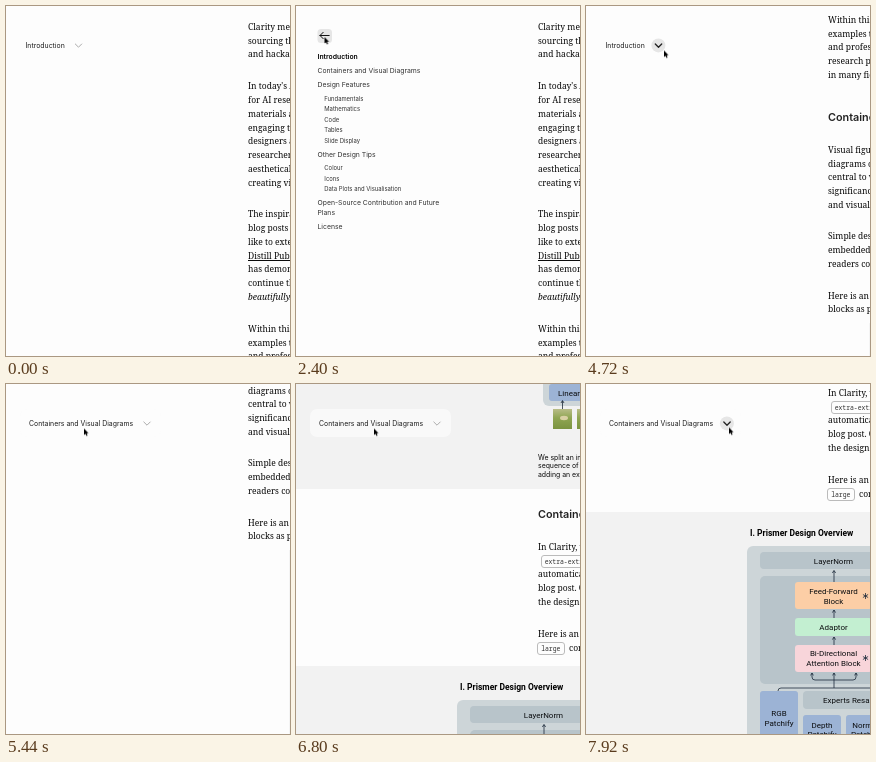
An HTML page that plays this animation: 284x350 px, repeating every 8 s.

```html
<!DOCTYPE html>
<html lang="en">
<head>
<meta charset="utf-8">
<title>Article with a floating table of contents</title>
<style>
  html, body { margin: 0; width: 100%; height: 100%; overflow: hidden; background: #fdfdfd; }
  #stage { position: absolute; inset: 0 auto auto 0; width: 284px; height: 350px; overflow: hidden; background: #fdfdfd; }
  svg { position: absolute; left: 0; width: 284px; height: 350px; overflow: visible; }

  /* One percent of every animation is 80 ms. */
  #article, #nav g[id], #cursor { animation: 8s linear both paused; }

  #article { position: absolute; left: 0; top: 0; animation-name: scroll; }
  #article p, #article h2 { position: absolute; left: 242px; margin: 0; white-space: pre; color: #0a0a0a; }
  #article p { font: 8.5px/13.8px "Noto Serif", serif; margin-top: .5px; }
  #article h2 { font: 600 10.8px/14px Inter, sans-serif; color: #222; }
  #article p.caption { font: 6.9px/8.4px Inter, sans-serif; }
  code { font: 6.4px/1 "Noto Sans Mono", monospace; padding: 1.2px 3.2px; border: .6px solid #bbb; border-radius: 3px; background: #fdfdfd; color: #333; }
  .panel { position: absolute; left: 0; width: 284px; background: #f2f2f2; }
  .block { position: absolute; left: 283px; width: 60px; background: #f4f4f4; }

  .fig text { font: 8px Roboto, sans-serif; fill: #0c0e10; text-anchor: middle; }
  .fig text.title { font: 700 8.5px Roboto, sans-serif; fill: #000; text-anchor: start; }
  .shell { fill: #cdd5d8; } .inner { fill: #b8c4ca; } .blue { fill: #9cb3d5; }
  .wire { fill: none; stroke: #1c2a3a; stroke-width: .8; }

  #nav text { font: 6.92px Inter, sans-serif; fill: #1c1c1c; }
  #nav #toc text { font-size: 6.83px; fill: #333; }
  #nav #toc .sub text { font-size: 5.9px; }
  #nav #toc .now { font-weight: 600; fill: #000; font-size: 6.85px; }
  .line { fill: none; stroke: #aaa; stroke-width: 1; stroke-linecap: round; stroke-linejoin: round; }
  .dark { stroke: #222; stroke-width: 1.3; }
  .arrow { stroke: #555; }
  .arrow.dark { stroke: #111; stroke-width: 1; }
  .spot { fill: #e6e6e6; }

  #intro { animation-name: intro !important; }
  #introHover { animation-name: introHover !important; }
  #toc { animation-name: toc !important; }
  #backHover { animation-name: backHover !important; }
  #section { animation-name: section !important; }
  #sectionHover { animation-name: sectionHover !important; }
  #cursor { animation-name: cursor; }

  @keyframes scroll {
    0% { transform: translateY(0); }
    54% { transform: translateY(0); animation-timing-function: cubic-bezier(.3, .2, .4, 1); }
    65%, 67% { transform: translateY(-456px); }
    68% { transform: translateY(-460px); animation-timing-function: cubic-bezier(.3, .2, .5, 1); }
    73%, 74% { transform: translateY(-760px); }
    75% { transform: translateY(-768px); }
    76% { transform: translateY(-790px); }
    85% { transform: translateY(-1146px); animation-timing-function: cubic-bezier(.2, .55, .4, 1); }
    95%, 100% { transform: translateY(-1300px); }
  }
  @keyframes intro {
    0%, 19% { opacity: 1; }
    22%, 38% { opacity: 0; }
    42%, 60% { opacity: 1; }
    62%, 100% { opacity: 0; }
  }
  @keyframes introHover {
    0%, 11% { opacity: 0; }
    14%, 22% { opacity: 1; }
    23%, 44% { opacity: 0; }
    47%, 100% { opacity: 1; }
  }
  @keyframes toc {
    0%, 19% { opacity: 0; }
    22%, 38% { opacity: 1; }
    41%, 100% { opacity: 0; }
  }
  @keyframes backHover {
    0%, 27% { opacity: 0; }
    30%, 100% { opacity: 1; }
  }
  @keyframes section {
    0%, 60% { opacity: 0; }
    62%, 100% { opacity: 1; }
  }
  @keyframes sectionHover {
    0%, 96% { opacity: 0; }
    99%, 100% { opacity: 1; }
  }
  @keyframes cursor {
    0%, 3.9% { opacity: 0; transform: translate(272px, 330px); }
    4% { opacity: 1; transform: translate(272px, 330px); animation-timing-function: cubic-bezier(.4, .3, .5, 1); }
    11% { transform: translate(62px, 30px); animation-timing-function: ease-in-out; }
    14% { transform: translate(70.5px, 37.5px); }
    17%, 24% { transform: translate(68px, 39px); animation-timing-function: ease-in-out; }
    30%, 41% { transform: translate(28.5px, 31px); animation-timing-function: ease-in-out; }
    49%, 50% { transform: translate(72px, 40px); }
    53%, 92% { transform: translate(78px, 44.5px); animation-timing-function: ease-in; }
    96% { transform: translate(123px, 40px); animation-timing-function: ease-out; }
    99%, 100% { opacity: 1; transform: translate(143px, 43.5px); }
  }
</style>
</head>
<body>
<div id="stage">

  <div id="article">
    <p style="top:13.4px">Clarity means open
sourcing the design
and hackable tools</p>
    <p style="top:72.7px">In today's AI era
for AI researchers
materials are now
engaging the wide
designers and the
researchers build
aesthetically and
creating vivid web</p>
    <p style="top:200.7px">The inspiration is
blog posts that we
like to extend the
<u>Distill Publication</u>
has demonstrated
continue this work
<i>beautifully.</i></p>
    <p style="top:315.3px">Within this page
examples tailored
and professional
research projects
in many fields.</p>

    <h2 style="top:414px">Containers and Visual</h2>
    <p style="top:445.3px">Visual figures and
diagrams often are
central to visually
significance of the
and visual results</p>
    <p style="top:531.7px">Simple designs are
embedded so that
readers could read</p>
    <p style="top:591.2px">Here is an example
blocks as plain text</p>
    <div class="block" style="top:626px;height:204px"></div>
    <p style="top:862.1px">For more complex
use a separate file
are easily drawn to
explain each part.</p>
    <p style="top:935.2px">Here is an example</p>

    <div class="panel" style="top:960px;height:291px"></div>
    <svg class="fig" style="top:790px">
      <defs>
        <linearGradient id="grass" x2="0" y2="1">
          <stop stop-color="#b9bd88"/><stop offset=".45" stop-color="#8fa552"/><stop offset="1" stop-color="#7b9440"/>
        </linearGradient>
      </defs>
      <rect class="shell" x="247" y="204" width="120" height="174" rx="6"/>
      <rect class="inner" x="253" y="210" width="110" height="138" rx="4"/>
      <rect class="wire" x="270" y="220" width="80" height="58" rx="1.5"/>
      <rect class="wire" x="270" y="285.5" width="80" height="59" rx="1.5"/>
      <path fill="#e2d6cb" d="M283 226h9v22h-9zM283 292h9v22h-9z"/>
      <path fill="#c4e4d2" d="M283 254h9v18h-9z"/>
      <rect class="blue" x="253" y="356" width="110" height="17" rx="3"/>
      <text x="262" y="368" style="text-anchor:start">Linear Projection</text>
      <path class="wire" d="M266.5 381v-8M265 375l1.5-2.5 1.5 2.5"/>
      <rect x="257" y="381" width="19" height="20" fill="url(#grass)"/>
      <ellipse cx="268" cy="390" rx="4" ry="2.2" fill="#d9d0a4"/>
      <rect x="281" y="381" width="19" height="20" fill="url(#grass)"/>
    </svg>
    <p class="caption" style="top:1215.2px">We split an image into
sequence of vectors
adding an extra token</p>

    <h2 style="top:1270px">Containers Layout</h2>
    <p style="top:1301.4px">In Clarity, we use
<code style="margin-left:2.5px">extra-extra-large</code>
automatically in a
blog post. Change
the design options</p>
    <p style="top:1388.4px">Here is an example
<code style="margin-left:-1px">large</code>  container</p>

    <div class="panel" style="top:1428px;height:420px"></div>
    <svg class="fig" style="top:1300px">
      <text class="title" x="164" y="152">I. Prismer Design Overview</text>
      <rect class="shell" x="161" y="162" width="174" height="260" rx="6"/>
      <rect class="inner" x="174" y="168" width="147" height="17" rx="4"/>
      <rect class="inner" x="174" y="192" width="147" height="108" rx="5"/>
      <rect x="209" y="198" width="77" height="27" rx="3" fill="#fccea6"/>
      <rect x="209" y="234" width="77" height="18" rx="3" fill="#c3efd1"/>
      <rect x="209" y="261" width="77" height="27" rx="3" fill="#f8d5da"/>
      <path class="wire" d="M248 198v-11M248 234v-8M248 261v-8M248 304v-15M226 289v4q0 3 3 3h38q3 0 3-3v-4M192 307q0-3 3-3h90"/>
      <path class="wire" d="M246.4 189l1.6-2.6 1.6 2.6M246.4 228.6l1.6-2.6 1.6 2.6M246.4 255.6l1.6-2.6 1.6 2.6M224.6 291.4l1.4-2.4 1.4 2.4M246.6 291.4l1.4-2.4 1.4 2.4M268.6 291.4l1.4-2.4 1.4 2.4"/>
      <path class="wire" d="M279.5 209v6M276.9 210.5l5.2 3M282.1 210.5l-5.2 3M279.5 271v6M276.9 272.5l5.2 3M282.1 272.5l-5.2 3"/>
      <text x="247.5" y="179.5">LayerNorm</text>
      <text x="247.5" y="210">Feed-Forward</text>
      <text x="247.5" y="219.6">Block</text>
      <text x="247.5" y="246.2">Adaptor</text>
      <text x="247.5" y="272.4">Bi-Directional</text>
      <text x="247.5" y="282">Attention Block</text>
      <rect class="blue" x="174" y="307" width="38" height="60" rx="3"/>
      <rect class="inner" x="217" y="307" width="104" height="18" rx="4"/>
      <rect class="blue" x="217" y="331" width="38" height="36" rx="3"/>
      <rect class="blue" x="260" y="331" width="38" height="36" rx="3"/>
      <text x="193" y="332.4">RGB</text>
      <text x="193" y="342">Patchify</text>
      <text x="237" y="319" style="text-anchor:start">Experts Resampler</text>
      <text x="236" y="344">Depth</text>
      <text x="236" y="353.4">Patchify</text>
      <text x="279.5" y="344">Normal</text>
      <text x="279.5" y="353.4">Patchify</text>
    </svg>
  </div>

  <svg id="nav" style="top:0">
    <g id="intro">
      <text x="19.5" y="41.6">Introduction</text>
      <path class="line" d="M69.3 38l3.2 3.2 3.2-3.2"/>
      <g id="introHover">
        <circle class="spot" cx="72.4" cy="39.4" r="7"/>
        <path class="line dark" d="M69.3 38l3.2 3.2 3.2-3.2"/>
      </g>
    </g>

    <g id="toc">
      <path class="line arrow" d="M24 29.5h9.2M27.2 26.3l-3.2 3.2 3.2 3.2"/>
      <g id="backHover">
        <rect class="spot" x="21.5" y="23" width="14.5" height="14" rx="3.5"/>
        <path class="line arrow dark" d="M24 29.5h9.2M27.2 26.3l-3.2 3.2 3.2 3.2"/>
      </g>
      <text class="now" x="21.5" y="52.5">Introduction</text>
      <text x="21.5" y="67">Containers and Visual Diagrams</text>
      <text x="21.5" y="81.3">Design Features</text>
      <g class="sub">
        <text x="28.3" y="94.7">Fundamentals</text>
        <text x="28.3" y="105.3">Mathematics</text>
        <text x="28.3" y="115.8">Code</text>
        <text x="28.3" y="126.4">Tables</text>
        <text x="28.3" y="136.9">Slide Display</text>
      </g>
      <text x="21.5" y="150.8">Other Design Tips</text>
      <g class="sub">
        <text x="28.3" y="164.2">Colour</text>
        <text x="28.3" y="174.8">Icons</text>
        <text x="28.3" y="185.3">Data Plots and Visualisation</text>
      </g>
      <text x="21.5" y="199.4">Open-Source Contribution and Future</text>
      <text x="21.5" y="209">Plans</text>
      <text x="21.5" y="223.4">License</text>
    </g>

    <g id="section">
      <rect x="14" y="25" width="141" height="28" rx="7" fill="#fdfdfd" fill-opacity=".7"/>
      <text x="23" y="41.6">Containers and Visual Diagrams</text>
      <path class="line" d="M137.8 38l3.2 3.2 3.2-3.2"/>
      <g id="sectionHover">
        <circle class="spot" cx="140.9" cy="39.4" r="7"/>
        <path class="line dark" d="M137.8 38l3.2 3.2 3.2-3.2"/>
      </g>
    </g>

    <path id="cursor" d="M0 0v6.6l1.5-1.4 1.1 2.4 1-.5-1-2.3h2z" fill="#000" stroke="#fff" stroke-width=".5" paint-order="stroke"/>
  </svg>
</div>

<script>
  const LOOP = 8000, STEP = 80;
  const parts = document.getAnimations();

  function tick() {
    const time = Math.floor(performance.now() % LOOP / STEP) * STEP;
    for (const part of parts) part.currentTime = time;
    requestAnimationFrame(tick);
  }
  tick();
</script>
</body>
</html>
```
